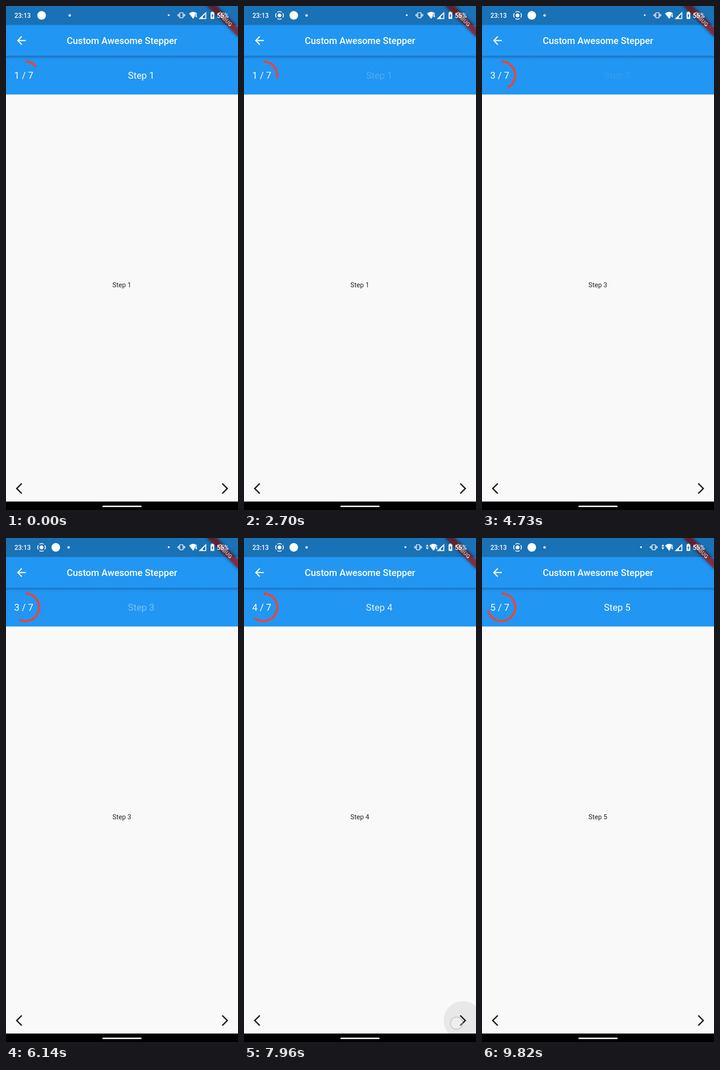
An HTML page for the animation above (9850 ms loop, 508 by 1102 pixels).

```html
<!DOCTYPE html>
<html lang="en">
<head>
<meta charset="utf-8">
<title>Custom Awesome Stepper</title>
<style>
html, body { margin: 0; width: 100%; height: 100%; overflow: hidden; background: #000; }
svg { display: block; width: 100%; height: 100%; font-family: Roboto, "Noto Sans", sans-serif; }
text { fill: #fff; text-anchor: middle; }
.header { font-size: 20.6px; }
.status { font-size: 14px; font-weight: 500; text-anchor: start; }
.white { fill: #fff; }
</style>
</head>
<body>
<svg viewBox="0 0 508 1102">
  <defs>
    <linearGradient id="shade" x2="0" y2="1">
      <stop offset="0" stop-opacity=".26"/>
      <stop offset=".45" stop-opacity=".1"/>
      <stop offset="1" stop-opacity="0"/>
    </linearGradient>
    <filter id="blur" x="-20%" y="-100%" width="140%" height="300%"><feGaussianBlur stdDeviation="3.6"/></filter>
  </defs>

  <rect width="508" height="1102" fill="#f9f9f9"/>
  <rect width="508" height="193.5" fill="#2196f3"/>
  <rect y="109" width="508" height="8" fill="url(#shade)"/>

  <!-- App bar -->
  <path class="white" transform="translate(19.2 61) scale(1.21)"
    d="M20 11H7.83l5.59-5.59L12 4l-8 8 8 8 1.41-1.41L7.83 13H20z"/>
  <text x="254" y="82.8" font-size="20.35" font-weight="500">Custom Awesome Stepper</text>

  <!-- Stepper header -->
  <path id="arc" fill="none" stroke="#f44336" stroke-width="4.6"/>
  <text id="counter" class="header" x="39" y="158.6"></text>
  <text id="heading" class="header" x="296" y="158.6"></text>

  <!-- Page -->
  <text id="page" x="253.7" y="614.8" font-size="14.4" letter-spacing=".1" style="fill:#212121"></text>
  <circle id="splash" cx="479.3" cy="1055" r="42.3"/>
  <g fill="#222">
    <path transform="translate(14.1 1040.5) scale(1.21)" d="M17.77 3.77L16 2 6 12l10 10 1.77-1.77L9.54 12z"/>
    <path transform="translate(464.9 1040.5) scale(1.21)" d="M6.23 20.23L8 22l10-10L8 2 6.23 3.77 14.46 12z"/>
  </g>
  <circle id="touch" cx="465.5" cy="1061" r="13.5" fill="#fff" fill-opacity=".35" stroke="#a9a9b4" stroke-width="1.3"/>

  <!-- Corner banner -->
  <g transform="translate(508) rotate(45)">
    <rect x="-48.4" y="33.1" width="96.8" height="14.4" fill-opacity=".5" filter="url(#blur)"/>
    <rect x="-48.4" y="33.1" width="96.8" height="14.4" fill="#b71c1c" fill-opacity=".627"/>
    <text y="44.6" font-size="12.2" font-weight="900" fill-opacity=".8">DEBUG</text>
  </g>

  <!-- Status bar -->
  <rect width="508" height="41.5" fill-opacity=".25"/>
  <text class="status" x="18.6" y="26">23:13</text>
  <g id="recorder">
    <circle class="white" r="4.3"/>
    <circle r="8.4" fill="none" stroke="#fff" stroke-width="1.9"
      pathLength="80" stroke-dasharray="15 5" stroke-dashoffset="-12.5"/>
  </g>
  <circle id="app" class="white" cy="20.5" r="9.4"/>
  <circle id="moreDot" class="white" cy="20.5" r="2.6"/>
  <g id="tray">
    <circle class="white" cx="356.3" cy="20" r="2.1"/>
    <path class="white" transform="translate(375.6 11.8) scale(.7)" fill-rule="evenodd"
      d="M0 15h2V9H0zM3 17h2V7H3zM22 9v6h2V9zM19 17h2V7h-2zM16.5 3h-9Q6 3 6 4.5v15Q6 21 7.5 21h9q1.5 0 1.5-1.5v-15Q18 3 16.5 3zM16 19H8V5h8z"/>
    <path id="traffic" class="white" d="M404 13.8l3 4.8h-6zM404 25.2l3-4.8h-6z"/>
  </g>
  <g id="wifi">
    <path class="white" d="M409.8 28L400.8 16.6Q409.8 9 418.8 16.6z"/>
    <text x="416" y="25" font-size="9.5" font-weight="700" stroke="#1970b6" stroke-width="2" paint-order="stroke">4</text>
  </g>
  <path class="white" fill-rule="evenodd" d="M438.5 12.5V28.5H421.8zM436.5 17.5L431 23v3.5h5.5z"/>
  <path class="white" transform="translate(442.4 10.6) scale(.8)" fill-rule="evenodd"
    d="M15.67 4H14V2h-4v2H8.33Q7 4 7 5.33v15.34Q7 22 8.33 22h7.34Q17 22 17 20.67V5.33Q17 4 15.67 4zM11 20v-5.5H9L13 7v5.5h2z"/>
  <text class="status" x="461.5" y="26">55%</text>

  <!-- System navigation -->
  <rect y="1083.5" width="508" height="18.5"/>
  <rect class="white" x="211" y="1092.5" width="86" height="3" rx="1.5"/>
</svg>
<script>
const LOOP = 9850, STEPS = 7, FADE = 700, SWEEP = 400, RELEASE = 200;
const TAPS = [{ down: 2070, up: 2140 }, { down: 3900, up: 3980 }, { down: 5610, up: 5720 }, { down: 7785, up: 7865 }];

const el = id => document.getElementById(id);
const set = (id, name, value) => el(id).setAttribute(name, value);
const ramp = (t, start, length) => Math.min(1, Math.max(0, (t - start) / length));
const mix = (a, b, p) => a + (b - a) * p;
const easeOut = p => 1 - (1 - p) ** 3;

function arcPath(fraction) {
  const cx = 42.5, cy = 151.5, r = 30.2, a = fraction * 2 * Math.PI;
  return `M${cx} ${cy - r}A${r} ${r} 0 ${+(fraction > .5)} 1 ${cx + r * Math.sin(a)} ${cy - r * Math.cos(a)}`;
}

function drawStepper(t) {
  let step = 1, progress = 1, opacity = 1, press = 0, touch = 0;
  for (const { down, up } of TAPS) {
    progress += ramp(t, up, SWEEP);
    if (t >= up + FADE) step++;
    if (t >= up) opacity = Math.min(1, Math.abs(t - up - FADE) / FADE);
    press += ramp(t, down, up - down) - ramp(t, up, RELEASE);
    touch += ramp(t, down, 30) - ramp(t, up + 60, 120);
  }
  set("arc", "d", arcPath(progress / STEPS));
  el("counter").textContent = `${step} / ${STEPS}`;
  el("heading").textContent = el("page").textContent = `Step ${step}`;
  set("heading", "opacity", opacity);
  set("splash", "opacity", .125 * press);
  set("touch", "opacity", touch);
}

function drawStatusBar(t) {
  const arrive = easeOut(ramp(t, 20, 400));
  set("recorder", "transform", `translate(77.8 20.5) scale(${arrive})`);
  set("recorder", "opacity", arrive);
  set("app", "cx", mix(78, 109, arrive));
  set("moreDot", "cx", mix(139.5, 137, arrive));

  // The traffic arrows push the Wi-Fi fan aside, then the tray slides left.
  const start = 7890, slide = ramp(t, start, 200), active = t >= start;
  set("tray", "transform", `translate(${-8 * slide})`);
  set("traffic", "opacity", +active);
  set("wifi", "transform", `translate(${active ? 8 * (1 - slide) : 0})`);
}

function frame(now) {
  const t = now % LOOP;
  drawStepper(t);
  drawStatusBar(t);
  requestAnimationFrame(frame);
}
frame(0);
</script>
</body>
</html>
```
